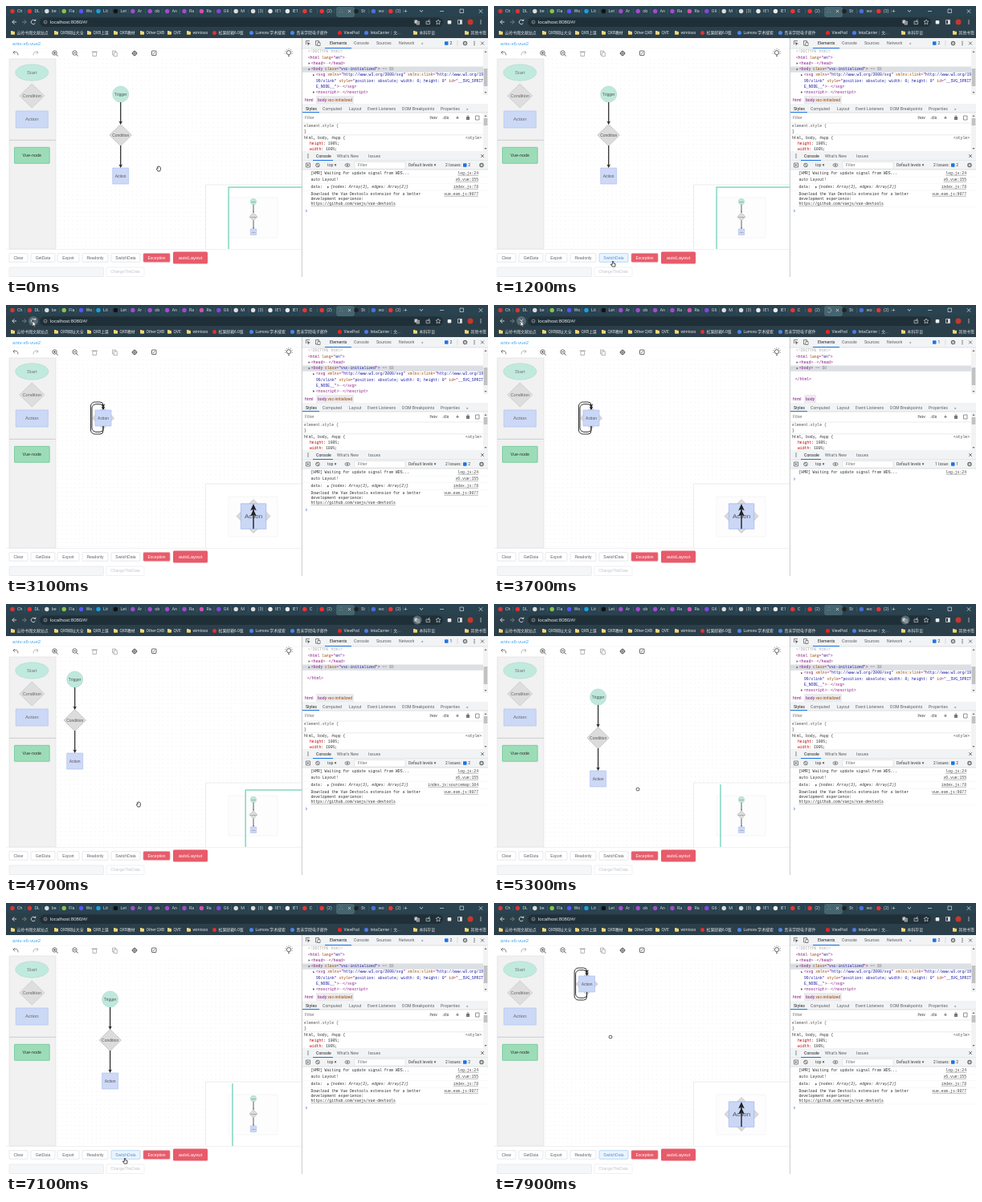
Recreate the animation shown at these times as an HTML page with a canvas. Size 600 by 338 pixels, loop 8 s.

```html
<!DOCTYPE html>
<html lang="en">
<head>
<meta charset="utf-8">
<title>Graph editor</title>
<style>
html, body { margin: 0; width: 100%; height: 100%; overflow: hidden; background: #fff; }
canvas { display: block; width: 600px; height: 338px; }
</style>
</head>
<body>
<canvas id="stage" width="600" height="338"></canvas>
<script>
const ctx = document.getElementById('stage').getContext('2d');
const LOOP = 8000;
const SANS = '"Liberation Sans", "Noto Sans CJK SC", "Noto Sans CJK", sans-serif';
const UI = 'Roboto, "Noto Sans CJK SC", "Noto Sans CJK", sans-serif';
const MONO = '"Liberation Mono", monospace';

// [time, x, y]
const POINTER = [
  [0, 190, 203], [200, 182, 215], [400, 178, 225], [1000, 148, 321], [1300, 148, 321],
  [1700, 158, 153], [2100, 153, 186], [2300, 150, 203], [2900, 33, 20], [4000, 33, 20],
  [4600, 165, 250], [4700, 165, 250], [4800, 135, 209], [5300, 179, 231], [5800, 179, 231],
  [6300, 179, 235], [7000, 148, 321], [7500, 148, 321], [7900, 145, 167]
];
const ORIGIN = [
  [0, 142.7, 110], [1700, 142.7, 110], [2100, 138, 143], [2300, 135, 160], [3999, 135, 160],
  [4000, 85.7, 94], [4800, 85.7, 94], [5300, 129.6, 116], [5800, 129.6, 116], [6300, 129.6, 120]
];
const between = (t, a, b) => t >= a && t < b;

function track(keys, t) {
  let i = keys.length - 1;
  while (i > 0 && keys[i][0] > t) i--;
  const a = keys[i], b = keys[i + 1];
  if (!b) return [a[1], a[2]];
  const p = (t - a[0]) / (b[0] - a[0]);
  const e = p * p * (3 - 2 * p);
  return [a[1] + (b[1] - a[1]) * e, a[2] + (b[2] - a[2]) * e];
}

function text(s, x, y, size, color = '#333', font = SANS, align = 'left', style = '') {
  ctx.font = style + ' ' + size + 'px ' + font;
  ctx.textBaseline = 'middle';
  ctx.textAlign = align;
  ctx.fillStyle = color;
  ctx.fillText(s, x, y);
  return ctx.measureText(s).width;
}

function rect(x, y, w, h, fill, stroke, r = 0, lw = 0.7) {
  ctx.beginPath();
  ctx.roundRect(x, y, w, h, r);
  paint(fill, stroke, lw);
}

function paint(fill, stroke, lw = 0.7) {
  if (fill) { ctx.fillStyle = fill; ctx.fill(); }
  if (stroke) { ctx.strokeStyle = stroke; ctx.lineWidth = lw; ctx.stroke(); }
}

function ellipse(x, y, rx, ry, fill, stroke, lw) {
  ctx.beginPath();
  ctx.ellipse(x, y, rx, ry, 0, 0, Math.PI * 2);
  paint(fill, stroke, lw);
}
const circle = (x, y, r, fill, stroke, lw) => ellipse(x, y, r, r, fill, stroke, lw);

function poly(points, fill, stroke, lw, closed = true) {
  ctx.beginPath();
  points.forEach(([x, y]) => ctx.lineTo(x, y));
  if (closed) ctx.closePath();
  paint(fill, stroke, lw);
}
const line = (x1, y1, x2, y2, color, lw) => poly([[x1, y1], [x2, y2]], null, color, lw, false);
const diamond = (x, y, rx, ry, fill, stroke) =>
  poly([[x, y - ry], [x + rx, y], [x, y + ry], [x - rx, y]], fill, stroke);
const cross = (x, y, r, c) => { line(x - r, y - r, x + r, y + r, c, 0.8); line(x - r, y + r, x + r, y - r, c, 0.8); };
const gear = (x, y) => { circle(x, y, 2.1, null, '#666', 1.2); circle(x, y, 0.6, '#666'); };
const kebab = (x, y, c = '#555') => [-2, 0, 2].forEach(d => circle(x, y + d, 0.65, c));
const triangle = (x, y) => poly([[x, y - 1.4], [x + 2.3, y], [x, y + 1.4]], '#666');

function clipped(x, y, w, h, draw) {
  ctx.save();
  ctx.beginPath();
  ctx.rect(x, y, w, h);
  ctx.clip();
  draw();
  ctx.restore();
}

/* Browser frame */
const TABS = ['Ch', 'DL', 'be', 'Fla', 'Wo', 'Lit', 'Let', 'Ar', 'ob', 'An', 'Ra', 'Ra', 'G6', 'M', '(3)', 'IE1', 'IE1', 'C', '(2)', '', 'St', 'wo', '(2)'];
const TAB_COLORS = ['#d33', '#d33', '#ddd', '#8bc34a', '#55f', '#18a0e0', '#111', '#a34ad0', '#a34ad0', '#a34ad0', '#a34ad0', '#d050b0', '#8844dd', '#ddd', '#ddd', '#eee', '#eee', '#e33', '#e33', '', '#222', '#4a6fd8', '#e33'];
const MARKS = [
  [6, '云岭书阁文献站点', 0], [60, 'QXB网址大全', 0], [101, 'QXB上课', 0], [134, 'QXB教材', 0],
  [167, 'Other QXB', 0], [201, 'QVE', 0], [225, 'wimtoso', 0], [257, '松果邮箱6.0版', '#d33'],
  [303, 'Lumora 学术搜索', '#4a86e8'], [354, '青禾学院电子邮件', '#4a86e8'], [413, 'ViewPod', '#e22'],
  [446, 'InkaCarrier｜文...', '#4a7de8'], [507, '本科毕设', 0], [571, '其他书签', 0]
];

function browser(t) {
  const loading = between(t, 3300, 4000);
  const bar = '#2b3f4a', pill = '#1f2f38', light = '#ddd';
  rect(0, 0, 600, 13, '#294350');
  rect(0, 13, 600, 27, bar);
  rect(411, 1, 23, 13, '#46656f', null, 3);
  TABS.forEach((s, i) => {
    const x = 8 + i * 21.4;
    if (i === 19) return;
    circle(x, 6.5, 2.7, TAB_COLORS[i]);
    text(s, x + 6, 6.7, 5.4, '#d4d5d7', UI);
    line(x + 15.7, 3.5, x + 15.7, 9.5, '#566b75', 0.5);
  });
  if (loading) {
    ctx.beginPath();
    const a = t / 160;
    ctx.arc(417, 6.5, 2.8, a, a + 4.4);
    paint(null, '#9aa0a6', 1);
  } else text('∴', 414, 6.5, 6, light);
  cross(427.5, 6.5, 1.6, light);
  text('+', 495, 6.5, 8, light);
  poly([[515, 5], [517, 7.5], [519, 5]], null, light, 0.8, false);
  line(540, 6.5, 545, 6.5, light, 0.7);
  rect(565, 4, 4.5, 4.5, null, light);
  cross(591, 6.5, 2.2, light);

  rect(42, 14.5, 502, 11.5, pill, null, 6);
  poly([[10.5, 17.5], [7.7, 20], [10.5, 22.5]], null, light, 0.9, false);
  line(8, 20, 13, 20, light, 0.9);
  poly([[22.5, 17.5], [25.3, 20], [22.5, 22.5]], null, '#788', 0.9, false);
  line(20, 20, 25, 20, '#788', 0.9);
  if (between(t, 2900, 4100)) circle(34, 20, 6, '#546a74');
  if (loading) cross(34, 20, 2.3, '#eee');
  else {
    ctx.beginPath();
    ctx.arc(34, 20, 2.7, 0.5, 5.5);
    paint(null, light, 0.9);
    poly([[34.5, 18.8], [37.2, 18.8], [37.2, 16.2]], light);
  }
  circle(49, 20, 2, null, '#aaa', 0.7);
  line(49, 19.8, 49, 21.2, '#aaa', 0.7);
  text('localhost:8080/#/', 55, 20.3, 6.1, '#e8eaed');
  if (!loading) {
    if (between(t, 4000, 5900)) circle(512, 20, 5.5, '#546a74');
    rect(508.5, 17.5, 3.6, 4.2, '#ccc');
    rect(511, 19, 3.6, 4.2, '#888', '#ccc', 0, 0.5);
  }
  rect(523, 19, 4.6, 3.6, null, '#ccc');
  line(525.3, 20.5, 527.2, 16.8, '#ccc', 0.8);
  poly([[538, 17], [539, 19], [541, 19], [539.4, 20.6], [540, 23], [538, 21.6], [536, 23], [536.6, 20.6], [535, 19], [537, 19]], null, '#ccc');
  rect(549.7, 18, 4.6, 4.6, '#eee', null, 1);
  rect(562.5, 17.5, 5, 5, null, light);
  rect(565, 17.5, 2.5, 5, light);
  circle(578, 20, 3.5, '#c4382c');
  kebab(591, 20, light);

  MARKS.forEach(([x, s, c]) => {
    if (c) circle(x + 2.5, 33.5, 2.5, c);
    else { rect(x, 31.7, 5, 4, '#f3d675', null, 0.6); rect(x, 31, 2.4, 1.4, '#f3d675'); }
    text(s, x + 7.5, 33.7, 4.9, '#e2e3e5', UI);
  });
}

/* Editor page */
const BUTTONS = [[4, 23, 'Clear'], [31, 30, 'GetData'], [64, 27, 'Export'], [95, 32, 'Readonly'], [131, 36, 'SwitchData'], [171, 33, 'Exception']];

function toolbar() {
  text('antv-x6-vue2', 8, 47.5, 6.1, '#45a6ea');
  line(0, 53, 368, 53, '#f3f3f3', 0.6);
  const c = '#444', dim = '#999';
  [[12, 1, '#666'], [37, -1, '#aaa']].forEach(([x, d, shade]) => {
    ctx.beginPath();
    ctx.moveTo(x - 3 * d, 58);
    ctx.quadraticCurveTo(x + 3 * d, 55.5, x + 3 * d, 61.5);
    paint(null, shade, 0.8);
    poly([[x - 1.2 * d, 56], [x - 3.2 * d, 58], [x - 0.8 * d, 60]], null, shade, 0.8, false);
  });
  [61, 86].forEach((x, i) => {
    circle(x - 0.5, 58.5, 2.7, null, c, 0.8);
    line(x + 1.5, 60.5, x + 3.5, 62.5, c, 0.9);
    line(x - 2, 58.5, x + 1, 58.5, c, 0.7);
    if (!i) line(x - 0.5, 57, x - 0.5, 60, c, 0.7);
  });
  rect(108, 57.5, 4.5, 5, null, dim);
  line(106.5, 57, 114, 57, dim, 0.8);
  rect(132.5, 56, 4, 5, null, dim);
  rect(134.3, 57.8, 4, 5, '#fff', dim);
  circle(160, 59, 2.5, null, c, 0.9);
  line(156.5, 59, 163.5, 59, c, 0.7);
  line(160, 55.5, 160, 62.5, c, 0.7);
  rect(181.5, 56, 5.5, 5.5, null, c, 0.5, 0.8);
  line(183, 60, 185.5, 57.5, c, 0.7);
  circle(352, 58.2, 2.6, null, c, 0.8);
  line(351, 62.2, 353, 62.2, c, 1);
  for (let a = -3; a <= 3; a++) {
    const s = Math.sin(a * 0.6), k = -Math.cos(a * 0.6);
    line(352 + s * 3.8, 58.2 + k * 3.8, 352 + s * 5, 58.2 + k * 5, c, 0.6);
  }
}

function palette() {
  rect(4, 66, 58, 237, '#f1f1f1', '#dedede', 0, 0.6);
  line(4, 167.3, 62, 167.3, '#c9c9c9', 0.9);
  ellipse(32.3, 83, 20.5, 10.2, '#c1eade', '#b2dccf');
  text('Start', 32.3, 83.4, 6, '#777', SANS, 'center');
  diamond(32.3, 112, 15.5, 15, '#dedede', '#c4c4c4');
  text('Condition', 32.3, 112.4, 5.6, '#666', SANS, 'center');
  rect(12.3, 131, 40, 21, '#ccd9f6', '#b0c1ee');
  text('Action', 32.3, 141.7, 6, '#666', SANS, 'center');
  rect(10.5, 176.3, 43.7, 20, '#9cddb8', '#5cc28f', 0.6, 0.7);
  text('Vue-node', 32.3, 186.4, 5.5, '#333', SANS, 'center');
}

function arrow(x, y1, y2, lw, size) {
  line(x, y1, x, y2 - size / 2, '#2b2b2b', lw);
  poly([[x, y2], [x - size * 0.5, y2 - size], [x, y2 - size * 0.75], [x + size * 0.5, y2 - size]], '#2b2b2b');
}

function flow(x, y, k) {
  const gap = 51 * k, label = 5 * k;
  circle(x, y, 10 * k, '#bfe8dc', '#a4d5c6', 0.6);
  diamond(x, y + gap, 13.7 * k, 13.5 * k, '#dcdcdc', '#b9b9b9');
  rect(x - 10 * k, y + 2 * gap - 10 * k, 20 * k, 20 * k, '#cdd9f6', '#a9baf0', 0, 0.6);
  arrow(x, y + 10 * k, y + gap - 13 * k, 1.25 * Math.sqrt(k), 4.6 * k);
  arrow(x, y + gap + 13 * k, y + 2 * gap - 10 * k, 1.25 * Math.sqrt(k), 4.6 * k);
  ['Trigger', 'Condition', 'Action'].forEach((s, i) => text(s, x, y + gap * i + 0.3, label, '#555', SANS, 'center'));
}

function stack(x, y) {
  diamond(x, y, 13.5, 13.5, '#dcdcdc', '#bbb');
  rect(x - 10, y - 10, 20, 20, '#cad7f6', '#a9baf0', 0, 0.6);
  text('Action', x, y + 0.3, 5, '#555', SANS, 'center');
  [[15.5, 20], [14, 17.3]].forEach(([w, h]) => {
    ctx.beginPath();
    ctx.moveTo(x, y + 10);
    ctx.arcTo(x, y + h, x - 6, y + h, 4);
    ctx.arcTo(x - w, y + h, x - w, y, 5);
    ctx.arcTo(x - w, y - h, x, y - h, 5);
    ctx.arcTo(x, y - h, x, y - 10, 4);
    ctx.lineTo(x, y - 11);
    paint(null, '#333', 1);
  });
  [10, 13].forEach(d => poly([[x, y - d], [x - 2.4, y - d - 4.4], [x, y - d - 3.4], [x + 2.4, y - d - 4.4]], '#222'));
}

function minimap(x, y, stacked) {
  rect(248.5, 223, 120, 80.5, '#fff', '#e4e4e4');
  rect(277, 239, 61, 50, '#fdfdfd', '#f1f1f1');
  if (stacked) {
    diamond(308, 263.5, 21, 21, '#dcdcdc', '#bbb');
    rect(292.3, 247.8, 31.5, 31.5, '#cad7f6', '#9fb3ee');
    text('Action', 308, 263.5, 8, '#555', SANS, 'center');
    line(308, 279, 308, 251, '#222', 1.4);
    [248, 255].forEach(v => poly([[308, v], [304.2, v + 8.5], [308, v + 6.5], [311.8, v + 8.5]], '#222'));
  } else {
    flow(308, 244, 0.37);
    clipped(248, 225, 120, 78, () =>
      rect(277 + (143 - x) * 0.37, 226 + (110 - y) * 0.37, 160, 120, null, '#84d6c0', 0, 1.5));
  }
}

function editor(t) {
  rect(0, 40, 368, 298, '#fff');
  toolbar();
  const [x, y] = track(ORIGIN, t);
  const stacked = between(t, 1300, 4000) || t >= 7500;
  clipped(62.5, 66, 305.5, 237, () => {
    const step = 5.3;
    ctx.fillStyle = '#e6e6e8';
    for (let gx = 62 + x % step; gx < 368; gx += step)
      for (let gy = 62 + y % step; gy < 304; gy += step) ctx.fillRect(gx, gy, 0.8, 0.8);
    if (stacked) stack(x - 14, y - 19); else flow(x, y, 1);
    minimap(x, y, stacked);
  });
  palette();
  line(0, 303.5, 368, 303.5, '#e8e8e8', 0.6);
  const focus = between(t, 1000, 1700) || t >= 6950;
  BUTTONS.forEach(([bx, w, s], i) => {
    const red = i === 5, on = i === 4 && focus;
    rect(bx, 308.7, w, 10.6, red ? '#e75b6a' : on ? '#eaf4ff' : '#fff', red ? '#ee8590' : on ? '#a3c8ee' : '#dcdfe6', 1);
    text(s, bx + w / 2, 314.3, 5, red ? '#fff' : on ? '#5592d0' : '#606266', SANS, 'center');
  });
  rect(208, 306.5, 43, 15, '#e75b6a', null, 1.5);
  text('autoLayout', 229.5, 314.2, 6, '#fff', SANS, 'center');
  rect(4, 326, 117.5, 11.5, '#f5f6f8', '#e2e5ea', 1);
  rect(125, 326, 47, 11.5, '#fff', '#e8eaf0', 1);
  text('ChangeTheData', 148.5, 332, 5, '#c0c4cc', SANS, 'center');
}

/* Developer tools */
const TAG = '#881280', ATTR = '#994500', VALUE = '#1a1aa6';
const CODE = 4.75;
function code(x, y, ...parts) {
  for (let i = 0; i < parts.length; i += 2) x += text(parts[i], x, y, CODE, parts[i + 1], MONO);
}
function labels(y, list, current) {
  list.forEach(([x, s], i) => text(s, x, y, 5.2, i === current ? '#222' : '#5f6368', UI));
}

function elements(t) {
  const empty = between(t, 3300, 5000), bare = between(t, 3300, 4000);
  const cls = ['<body ', TAG, 'class', ATTR, '="', TAG, 'vsc-initialized', VALUE, '">', TAG];
  code(376, 57, '<!DOCTYPE html>', '#aaa');
  code(376, 64.3, '<html ', TAG, 'lang', ATTR, '="', TAG, 'en', VALUE, '">', TAG);
  triangle(376.5, 71.6);
  code(380, 71.6, '<head>', TAG, '⋯', '#777', '</head>', TAG);
  rect(369, 75.4, 225, 7.3, '#dcdfe4');
  text('⋯', 369.5, 79, 5, '#666');
  triangle(376.5, 79);
  if (bare) code(380, 79, '<body>', TAG, ' == $0', '#888');
  else code(380, 79, ...cls, ' == $0', '#888');
  if (empty) code(375, 93, '</html>', TAG);
  else {
    triangle(382, 86.2);
    code(386, 86.2, '<svg ', TAG, 'xmlns', ATTR, '="', TAG, 'http://www.w3.org/2000/svg', VALUE, '" ', TAG, 'xmlns:xlink', ATTR, '="', TAG, 'http://www.w3.org/19', VALUE);
    code(386, 93.3, '99/xlink', VALUE, '" ', TAG, 'style', ATTR, '="', TAG, 'position: absolute; width: 0; height: 0', VALUE, '" ', TAG, 'id', ATTR, '="', TAG, '__SVG_SPRIT', VALUE);
    code(386, 100.4, 'E_NODE__', VALUE, '">', TAG, '⋯', '#777', '</svg>', TAG);
    triangle(382, 107.5);
    code(386, 107.5, '<noscript>', TAG, '⋯', '#777', '</noscript>', TAG);
  }
  rect(369, 111, 231, 11, '#fff');
  text('html', 372, 117, 5.3, TAG, UI);
  rect(386, 112, bare ? 15 : 47, 10, '#ebebee');
  const w = text('body', 388, 117, 5.1, TAG, UI);
  if (!bare) text('.vsc-initialized', 388 + w, 117, 5.1, ATTR, UI);
}

function logs(t) {
  const link = (s, y) => {
    const w = text(s, 588, y, CODE, '#444', MONO, 'right');
    line(588 - w, y + 2.3, 588, y + 2.3, '#777', 0.5);
  };
  const log = (s, y) => text(s, 379.5, y, CODE, '#303030', MONO);
  log('[HMR] Waiting for update signal from WDS...', 209);
  link('log.js:24', 209);
  let prompt = 217;
  if (!between(t, 3300, 4000)) {
    log('auto Layout!', 217);
    link('x6.vue:155', 217);
    log('data:', 226);
    triangle(400, 226);
    text('{nodes: Array(3), edges: Array(2)}', 404, 226, CODE, '#333', MONO, 'left', 'italic');
    link(between(t, 4000, 5000) ? 'index.js:sourcemap:104' : 'index.js:78', 226);
    log('Download the Vue Devtools extension for a better', 235);
    link('vue.esm.js:9077', 235);
    log('development experience:', 241);
    const w = log('https://github.com/vuejs/vue-devtools', 247);
    line(379.5, 249.3, 379.5 + w, 249.3, '#777', 0.5);
    [213, 221.5, 230.5, 251].forEach(y => line(369, y, 600, y, '#f0f0f0', 0.5));
    prompt = 255.5;
  }
  poly([[373, prompt - 1.5], [374.7, prompt], [373, prompt + 1.5]], null, '#4b78d0', 0.8, false);
}

function devtools(t) {
  const bar = '#f1f3f4', edge = '#cbcdd1', blue = '#1a73e8';
  rect(368, 40, 232, 298, '#fff');
  [[40, 13], [122, 11], [181, 12], [193, 11]].forEach(([y, h]) => {
    rect(368, y, 232, h, bar);
    line(368, y + h, 600, y + h, edge, 0.6);
  });
  elements(t);
  line(368.4, 40, 368.4, 338, '#b9bbbe', 0.8);
  poly([[373.5, 48], [373.5, 43.5], [378, 43.5]], null, '#555', 0.7, false);
  poly([[375, 45], [379, 47], [377, 47.5], [376, 49.5]], '#555');
  rect(385.5, 43.5, 4, 5.5, null, '#555');
  rect(388, 45.5, 3, 4, '#fff', '#555');
  labels(46.7, [[403, 'Elements'], [433, 'Console'], [461, 'Sources'], [489, 'Network'], [517, '»']], 0);
  line(397, 52.5, 430, 52.5, blue, 1);
  rect(546, 44.2, 4.5, 4.5, blue, null, 0.7);
  text(between(t, 3300, 5000) ? '1' : '2', 552.5, 46.7, 5, '#333', UI);
  line(562, 43, 562, 50, edge, 0.6);
  gear(571.5, 46.5);
  kebab(583, 46.5);
  cross(593, 46.5, 1.9, '#555');

  labels(128, [[373, 'Styles'], [394, 'Computed'], [427, 'Layout'], [450, 'Event Listeners'], [493, 'DOM Breakpoints'], [541, 'Properties'], [573, '»']], 0);
  line(369, 132.6, 390, 132.6, blue, 1);
  text('Filter', 372, 139.6, 5.3, '#777', UI);
  text(':hov', 527, 139.6, 5.3, '#333', UI);
  text('.cls', 543, 139.6, 5.3, '#333', UI);
  text('+', 560, 139.5, 7, '#444', UI);
  rect(573, 138, 4, 4, '#777');
  line(575, 136, 575, 138, '#777', 1);
  rect(584.5, 137, 4.5, 5, null, '#666');
  line(368, 146, 600, 146, '#ddd', 0.6);
  code(371, 149.8, 'element.style {', '#555');
  code(371, 157, '}', '#333');
  line(369, 160.8, 594, 160.8, '#ddd', 0.6);
  code(371, 165, 'html, body, #app {', '#333');
  text('<style>', 592, 165, CODE, '#444', MONO, 'right');
  clipped(369, 161, 225, 19.7, () => {
    code(378, 172, 'height', '#c80000', ': 100%;', '#333');
    code(378, 179, 'width', '#c80000', ': 100%;', '#333');
  });
  [[54, 57, 78, 22], [134, 47, 140, 9]].forEach(([y, h, ty, th]) => {
    rect(594, y, 6, h, '#f3f3f3');
    rect(594.7, ty, 4.6, th, '#c2c2c2');
    poly([[595.4, y + 4], [597, y + 2], [598.6, y + 4]], '#777');
    poly([[595.4, y + h - 4], [597, y + h - 2], [598.6, y + h - 4]], '#777');
  });

  kebab(376, 187);
  labels(187, [[386, 'Console'], [412, "What's New"], [451, 'Issues']], 0);
  line(382, 192.5, 407, 192.5, blue, 1);
  cross(593, 187, 1.8, '#555');
  rect(373.5, 196, 5, 5, null, '#555');
  poly([[375, 197.2], [377.4, 198.5], [375, 199.8]], '#555');
  circle(388, 198.5, 2.3, null, '#555', 0.8);
  line(386.5, 197, 389.5, 200, '#555', 0.8);
  text('top ▾', 400, 198.6, 5.2, '#444', UI);
  ellipse(425, 198.5, 3, 1.9, null, '#555');
  circle(425, 198.5, 0.9, '#555');
  rect(434, 194.5, 63, 8.5, '#fff', '#e0e0e0');
  text('Filter', 438, 198.8, 5.2, '#777', UI);
  text('Default levels ▾', 501, 198.6, 5.1, '#444', UI);
  const n = between(t, 3300, 4000) ? 1 : 2;
  text(n === 1 ? '1 Issue:' : '2 Issues:', n === 1 ? 549 : 547, 198.6, 5, '#444', UI);
  rect(569, 196.2, 4.5, 4.5, blue, null, 0.7);
  text(n, 575.3, 198.6, 5, '#444', UI);
  gear(592, 198.5);
  logs(t);
}

function pointer(t) {
  const [x, y] = track(POINTER, t);
  const drag = between(t, 1700, 2400) || between(t, 4800, 6400) || t >= 7700;
  ctx.save();
  ctx.translate(x, y);
  ctx.lineJoin = 'round';
  if (y < 40) {
    poly([[0, 0], [0, 6.5], [1.6, 5.2], [2.7, 7.5], [3.6, 7], [2.6, 4.8], [4.7, 4.7]], '#fff', '#222', 0.6);
  } else if (y > 306) {
    poly([[-0.6, -2.5], [0.7, -2.5], [0.9, 0], [3.2, 0.7], [2.7, 4], [-0.8, 4], [-2.7, 1], [-0.6, 1.3]], '#fff', '#222', 0.8);
  } else if (drag) {
    rect(-1.8, -1.7, 3.7, 3.5, '#fff', '#222', 1.4, 0.8);
  } else {
    poly([[-1.7, -2.2], [-0.5, -3], [1.3, -2.8], [2.5, -1.4], [2.2, 1.8], [1.5, 3], [-1, 3], [-2.7, 0.2], [-1.6, 0]], '#fff', '#222', 0.8);
    line(-0.2, -2.6, -0.2, 0, '#222', 0.4);
  }
  ctx.restore();
}

function frame(now) {
  const t = Math.floor((now % LOOP) / 100) * 100;
  ctx.clearRect(0, 0, 600, 338);
  editor(t);
  devtools(t);
  browser(t);
  pointer(t);
  requestAnimationFrame(frame);
}
requestAnimationFrame(frame);
</script>
</body>
</html>
```
